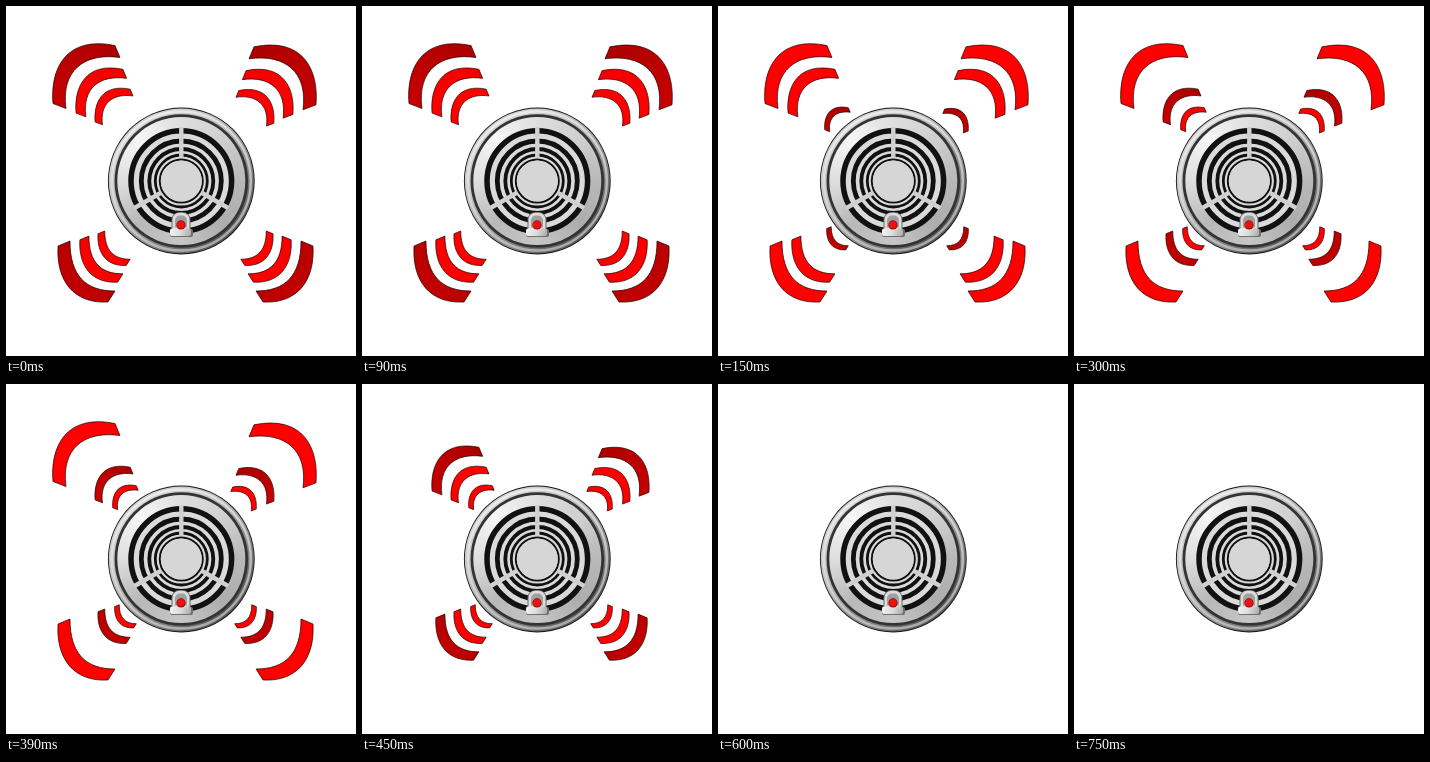
Animation of 350x350 px, one loop 0.85 s. Source, as an HTML page with a canvas:

```html
<!DOCTYPE html>
<html lang="en">
<head>
<meta charset="utf-8">
<title>Smoke alarm</title>
<style>
  html, body { margin: 0; width: 100%; height: 100%; overflow: hidden; background: #fff; }
  canvas { display: block; }
</style>
</head>
<body>
<canvas id="stage" width="350" height="350"></canvas>
<script>
const ctx = document.getElementById('stage').getContext('2d');
const LOOP = 850, STEP = 150;
const CX = 175.3, CY = 175;

// One wave on the left side, around its own middle
const upperWave = new Path2D('M-33 27C-36 -8 -20 -41 29 -31L34 -19C-2 -24 -25 -6 -20 32Z');
const lowerWave = new Path2D('M-28 -26C-30 9 -12 32 22 30L29 19C0 19 -16 4 -16 -31Z');

// Wave places and sizes from the inside out
const waves = [
  { x: 119.3, upper: 113.5, lower: 232.5, size: 0.38 },
  { x: 107.8, upper: 100.7, lower: 242.5, size: 0.565 },
  { x: 95, upper: 86.7, lower: 253.5, size: 0.755 },
  { x: 80, upper: 70.5, lower: 266, size: 1 }
];
const tones = {
  bright: ['#ff0000', '#ff0000'],
  middle: ['#f40000', '#ff0000'],
  dark: ['#ae0000', '#c80000']
};

// Tone of each wave, from the inside out, in every step
const steps = [
  [null, 'bright', 'middle', 'dark'],
  ['dark', null, 'bright', 'bright'],
  ['bright', 'dark', null, 'bright'],
  ['bright', 'bright', 'dark', null],
  []
];

function blend(gradient, colors) {
  colors.forEach((c, i) => gradient.addColorStop(i / (colors.length - 1), c));
  return gradient;
}

const shade = (x0, y0, x1, y1, ...colors) =>
  blend(ctx.createLinearGradient(x0, y0, x1, y1), colors);

function disc(x, y, r, fill) {
  ctx.beginPath();
  ctx.arc(x, y, r, 0, 7);
  ctx.fillStyle = fill;
  ctx.fill();
}

function ring(r, width, color) {
  ctx.beginPath();
  ctx.arc(CX, CY, r, 0, 7);
  ctx.lineWidth = width;
  ctx.strokeStyle = color;
  ctx.stroke();
}

function box(x, y, w, h, radii, fill) {
  ctx.beginPath();
  ctx.roundRect(x, y, w, h, radii);
  ctx.fillStyle = fill;
  ctx.fill();
}

function drawShape(path, x, y, side, size, tone) {
  ctx.save();
  ctx.translate(x, y);
  ctx.scale(side * size, size);
  ctx.fillStyle = shade(20, -32, -30, 30, ...tones[tone]);
  ctx.fill(path);
  ctx.lineWidth = 0.7 / size;
  ctx.strokeStyle = '#200000';
  ctx.stroke(path);
  ctx.restore();
}

function drawWave({ x, upper, lower, size }, tone) {
  drawShape(upperWave, x, upper, 1, size, tone);
  drawShape(upperWave, 357 - x, upper + 1.3, -1, size, tone);
  drawShape(lowerWave, x, lower, 1, size, tone);
  drawShape(lowerWave, 359 - x, lower, -1, size, tone);
}

function drawAlarm() {
  disc(CX, CY, 73.4, '#161616');
  disc(CX, CY, 72.5, shade(125, 115, 225, 235, '#d8d8d8', '#c0c0c0', '#8c8c8c', '#505050'));
  ring(69.5, 2.4, shade(140, 110, 210, 240, '#eeeeee', '#d0d0d0', '#a8a8a8'));
  disc(CX, CY, 66.8, '#333');
  // Brushed metal, clockwise from the right
  disc(CX, CY, 64, blend(ctx.createConicGradient(0, CX, CY),
    ['#b8b8b8', '#adadad', '#c6c6c6', '#b8b8b8', '#dedede', '#f6f6f6', '#dedede', '#d0d0d0', '#b8b8b8']));
  disc(CX, CY, 52, '#dadada');

  [[50.3, 5.5], [40, 4.8], [32, 3.8], [26, 2.8]]
    .forEach(([r, width]) => ring(r, width, '#111'));
  for (let i = 0; i < 3; i++) {
    ctx.save();
    ctx.translate(CX, CY);
    ctx.rotate(i * Math.PI * 2 / 3);
    ctx.fillStyle = '#d0d0d0';
    ctx.fillRect(-2.2, -54, 4.4, 31);
    ctx.restore();
  }
  ring(21.5, 2, '#111');
  disc(CX, CY, 20.5, '#d6d6d6');

  // Test button in its housing
  box(165.5, 206, 19, 24, [8, 8, 2, 2], '#6c6c6c');
  box(166.5, 206.8, 17, 23, [7, 7, 1, 1], '#dcdcdc');
  box(169, 209.5, 12, 12, [5, 5, 0, 0], '#a0a0a0');
  box(164, 223, 23, 8, 2, '#707070');
  box(164, 222.5, 21, 7.5, 2, shade(164, 222, 185, 230, '#f4f4f4', '#dddddd', '#a8a8a8'));
  disc(175, 218.9, 4.6, '#8a1010');
  disc(174.9, 218.7, 3.8, '#f01010');
}

function draw(time) {
  const step = Math.min(steps.length - 1, Math.floor(time % LOOP / STEP));
  ctx.fillStyle = '#fff';
  ctx.fillRect(0, 0, 350, 350);
  steps[step].forEach((tone, i) => tone && drawWave(waves[i], tone));
  drawAlarm();
  requestAnimationFrame(draw);
}

draw(0);
</script>
</body>
</html>
```
